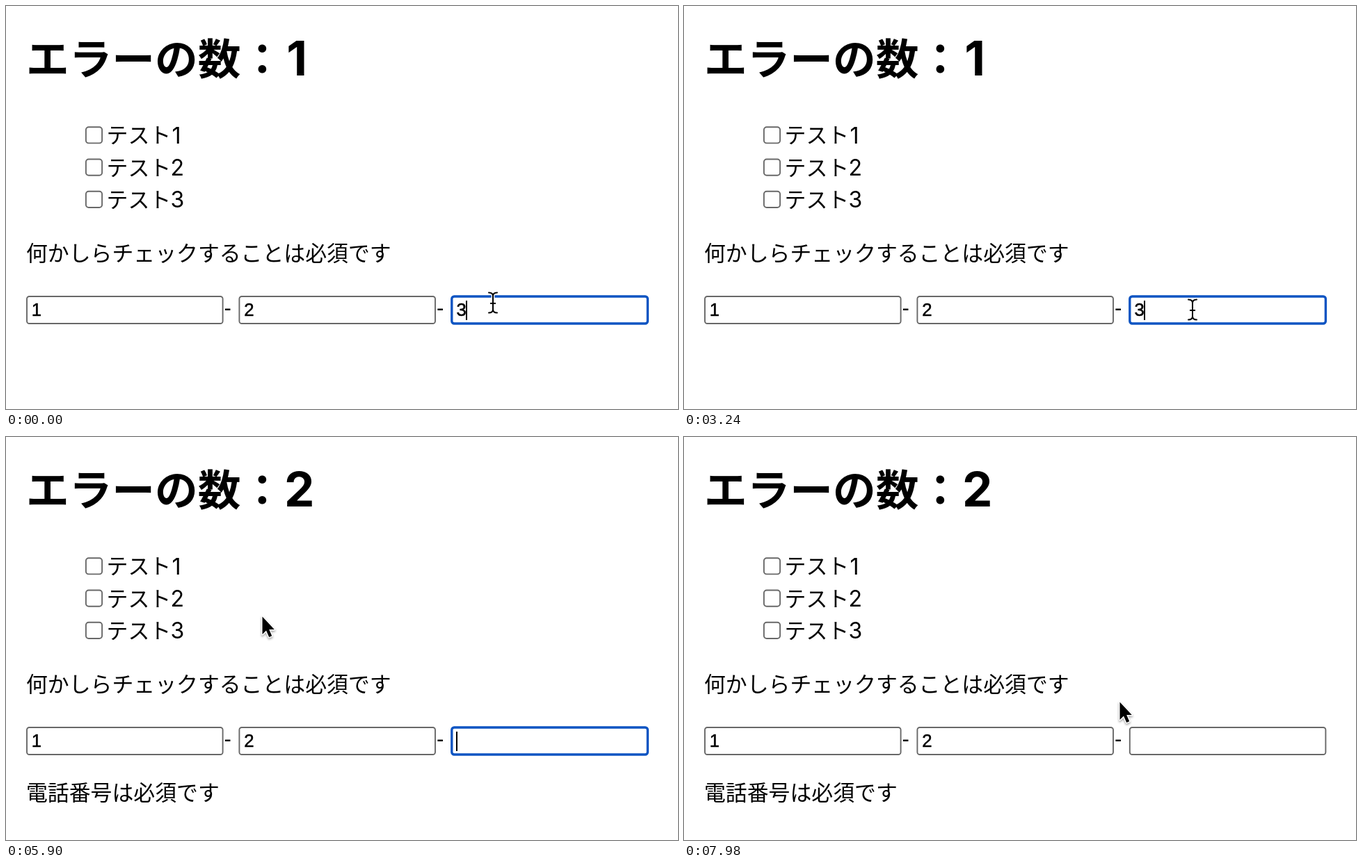
Write an HTML page that moves like this. It is 966x580 px and loops after 8000 ms.

```html
<!DOCTYPE html>
<html lang="ja">
<head>
<meta charset="utf-8">
<title>エラーの数</title>
<style>
  html, body { margin: 0; width: 100%; height: 100%; overflow: hidden; background: #fff; }
  svg { display: block; width: 100vw; height: 100vh; }
  text { font: 30.86px "Noto Sans CJK JP", "Noto Sans CJK", sans-serif; }
  .title { font-size: 61.7px; font-weight: 700; }
  .count { font: 700 69px Inter, sans-serif; }
  .digit { font: 32px Inter, sans-serif; }
  .value { font: 25.7px "Liberation Sans", sans-serif; stroke: #000; stroke-width: .5px; }
  .dash { font: 31px "Liberation Sans", sans-serif; }
  #arrow { filter: drop-shadow(0 2px 1.5px rgba(0, 0, 0, .35)); }
</style>
</head>
<body>
<svg id="stage" viewBox="0 0 966 580" xmlns="http://www.w3.org/2000/svg">
  <text class="title" x="29" y="98.5">エラーの数：</text>
  <text class="count" id="count" y="100"></text>
  <g id="rows"></g>
  <text id="needCheck" x="29" y="367.3">何かしらチェックすることは必須です</text>
  <g id="phone">
    <g id="fields"></g>
    <rect id="caret" y="424" width="2" height="28"/>
    <text id="needPhone" x="29" y="523">電話番号は必須です</text>
  </g>
  <g id="arrow">
    <path d="M1.5 1.5V27L7 21.6L11.2 31L15.2 29.2L11.2 20H18.8Z" stroke="#fff" stroke-width="3" stroke-linejoin="round" paint-order="stroke"/>
  </g>
  <g id="beam" fill="none" stroke-linecap="round"></g>
</svg>
<script>
const LOOP = 8000, BLINK = 420, SHIFT = -77.3;
const BLUE = '#0d54c2', GREY = '#686868', DARK = '#3c3c3c';
const $ = id => document.getElementById(id);

function add(parent, tag, attrs, text) {
  const el = document.createElementNS('http://www.w3.org/2000/svg', tag);
  set(el, attrs);
  if (text) el.textContent = text;
  parent.appendChild(el);
  return el;
}
function set(el, attrs) {
  for (const k in attrs) el.setAttribute(k, attrs[k]);
}
const show = (el, on) => set(el, { visibility: on ? 'visible' : 'hidden' });

const boxes = [0, 1, 2].map(i => {
  const g = add($('rows'), 'g', { transform: `translate(0 ${46.3 * i})` });
  const box = add(g, 'rect', { x: 114.9, y: 174.2, width: 23.2, height: 23.2, rx: 4, 'stroke-width': 1.9 });
  const tick = add(g, 'path', { d: 'M119.5 186.2L124 191L133.3 179', fill: 'none', stroke: '#fff', 'stroke-width': 3.6 });
  add(g, 'text', { x: 144.6, y: 197.3 }, 'テスト');
  add(g, 'text', { x: i ? 236.5 : 238.5, y: 197.8, class: 'digit' }, String(i + 1));
  return { box, tick };
});

const fieldX = [29, 334.4, 639.8];
const fields = fieldX.map((x, i) => {
  const box = add($('fields'), 'rect', { x: x + 1, y: 418, width: 281.6, height: 39, rx: 3.5, fill: '#fff', stroke: GREY, 'stroke-width': 1.9 });
  const value = add($('fields'), 'text', { x: x + 7.8, y: 446, class: 'value' }, String(i + 1));
  if (i < 2) add($('fields'), 'text', { x: x + 284.5, y: 445, class: 'dash' }, '-');
  return { box, value };
});

const beamPath = 'M-6 -14.5Q0 -14.5 0 -9.5Q0 -14.5 6 -14.5M0 -10V10M-6 14.5Q0 14.5 0 9.5Q0 14.5 6 14.5M-3.2 1H3.2';
add($('beam'), 'path', { d: beamPath, stroke: '#fff', 'stroke-width': 4.6 });
add($('beam'), 'path', { d: beamPath, stroke: '#000', 'stroke-width': 2 });

// Pointer path: time, x, y, easing of the stretch that ends there
const smooth = u => u * u * (3 - 2 * u), linear = u => u, speedUp = u => u * u;
const path = [
  [0, 700, 427, linear], [40, 700, 427, linear], [500, 173, 240, smooth],
  [2222, 173, 240, linear], [2260, 792, 517, linear],
  [2470, 792, 517, linear], [2850, 731, 437, smooth],
  [4420, 731, 437, linear], [4590, 779, 460, smooth],
  [5000, 779, 460, linear], [5800, 367, 257, smooth],
  [6100, 367, 257, linear], [6600, 219, 226, smooth],
  [7640, 219, 226, linear], [7850, 488, 324, speedUp],
  [7980, 625, 380, linear], [LOOP, 625, 380, linear]
];
function pointer(t) {
  const i = Math.max(1, path.findIndex(p => p[0] > t));
  const [t0, x0, y0] = path[i - 1], [t1, x1, y1, ease] = path[i];
  const u = ease((t - t0) / (t1 - t0));
  return [x0 + (x1 - x0) * u, y0 + (y1 - y0) * u];
}

const within = (t, a, b) => t >= a && t < b;

function draw(t) {
  const checked = within(t, 620, 1700) || within(t, 6800, 7480);
  const empty = t >= 3300;
  const focused = t < 620 || within(t, 2900, 6800);
  const errors = !checked + empty;
  const shift = checked ? SHIFT : 0;
  const [x, y] = pointer(t);

  $('count').textContent = errors;
  set($('count'), errors === 1 ? { x: 433, 'text-anchor': 'end' } : { x: 400, 'text-anchor': 'start' });
  show($('needCheck'), !checked);
  show($('needPhone'), empty);
  set($('phone'), { transform: `translate(0 ${shift})` });

  boxes.forEach(({ box, tick }, i) => {
    const on = checked && i === 1;
    const hover = within(x, 114, 257) && within(y - 46.3 * i, 169, 204);
    set(box, { fill: on ? BLUE : '#fff', stroke: on ? BLUE : hover ? DARK : GREY });
    show(tick, on);
  });

  set(fields[2].box, { stroke: focused ? BLUE : GREY, 'stroke-width': focused ? 3.4 : 1.9 });
  show(fields[2].value, !empty);

  const since = t < 620 ? t : t < 3300 ? t - 2900 : t - 3300;
  set($('caret'), { x: empty ? 647 : 661 });
  show($('caret'), focused && Math.floor(since / BLINK) % 2 === 0);

  const overField = within(y - shift, 417, 458) && fieldX.some(f => within(x, f, f + 284));
  const overText = !checked && within(x, 29, 553) && within(y, 340, 373);
  const beam = overField || overText;
  const hidden = within(t, 3300, 4420);   // typing hides the pointer
  show($('beam'), beam && !hidden);
  show($('arrow'), !beam && !hidden);
  const place = { transform: `translate(${x} ${y})` };
  set($('beam'), place);
  set($('arrow'), place);
}

const start = performance.now();
function tick() {
  draw((performance.now() - start) % LOOP);
  requestAnimationFrame(tick);
}
tick();
</script>
</body>
</html>
```
